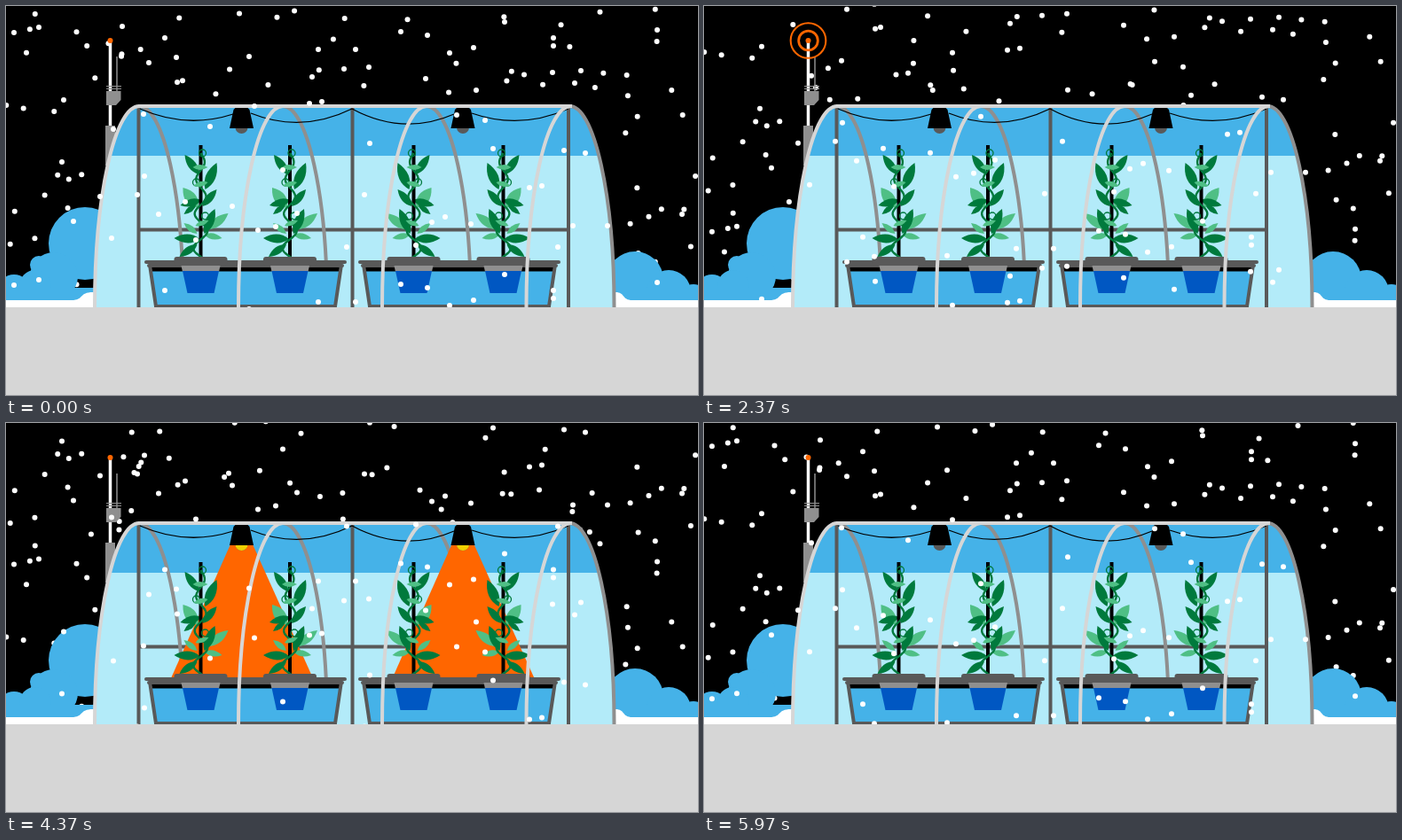
Write an HTML page with a canvas that moves like this. It is 780x439 px and loops after 6010 ms.

```html
<!DOCTYPE html>
<html lang="en">
<head>
<meta charset="utf-8">
<title>Greenhouse in the snow</title>
<style>
html, body { margin: 0; width: 100%; height: 100%; overflow: hidden; background: #000; }
canvas { display: block; }
</style>
</head>
<body>
<canvas id="stage" width="780" height="439"></canvas>
<script>
const c = document.getElementById('stage').getContext('2d');
const LOOP = 6010, FALL = LOOP / 2, TILE = 285;
const SKY = '#45b2e8', PALE = '#b3ebf9', LIGHT = '#d6d6d6', MID = '#8f8f8f', DARK = '#595959';
const ORANGE = '#ff6600', LEAF = '#007a3d', MINT = '#4fbf85', POT = '#0057c2';

// Flakes in front of the greenhouse, x and y at the start of the loop
const front = [
  155,122, 230,136, 156,192, 148,213, 172,235, 255,226, 284,253, 304,249, 328,234, 312,185,
  410,155, 404,213, 384,272, 508,123, 540,129, 549,161, 590,205, 604,203, 629,163, 653,166,
  639,248, 622,272, 678,248, 495,238, 480,244, 462,270, 524,246, 121,139, 106,215, 119,262,
  280,113, 342,110, 356,108, 345,80, 161,64, 193,86, 381,71, 409,69, 530,95, 616,75,
  641,87, 214,264, 352,49, 394,49, 274,57, 192,58, 562,18, 617,45, 617,36, 500,53,
  445,29, 179,36, 475,33, 473,82, 527,47, 648,73, 9,30, 37,24, 734,27, 202,221,
  63,176, 76,243, 65,106, 762,235
];

let seed = 41;
const random = () => (seed = (seed * 16807) % 2147483647) / 2147483647;
const back = Array.from({ length: 230 }, (_, i) => random() * (i % 2 ? TILE : 780));

const clamp = v => Math.max(0, Math.min(1, v));

function rect(color, x, y, w, h, r = 0) {
  c.fillStyle = color;
  c.beginPath();
  c.roundRect(x, y, w, h, r);
  c.fill();
}

function poly(color, ...p) {
  c.fillStyle = color;
  c.beginPath();
  for (let i = 0; i < p.length; i += 2) c.lineTo(p[i], p[i + 1]);
  c.fill();
}

function line(color, width, ...p) {
  c.strokeStyle = color;
  c.lineWidth = width;
  c.beginPath();
  for (let i = 0; i < p.length; i += 2) c.lineTo(p[i], p[i + 1]);
  c.stroke();
}

function disc(color, x, y, r) {
  c.fillStyle = color;
  c.beginPath();
  c.arc(x, y, r, 0, 7);
  c.fill();
}

// Quarter ellipse from the roof to the ground; side is -1 or 1
function arch(color, x, side, bottom = 340) {
  c.save();
  c.beginPath();
  c.rect(0, 0, 780, bottom);
  c.clip();
  c.strokeStyle = color;
  c.lineWidth = 4;
  c.beginPath();
  c.ellipse(x, 340, 50, 227, 0, side < 0 ? Math.PI : -Math.PI / 2, side < 0 ? 1.5 * Math.PI : 0);
  c.stroke();
  c.restore();
}

function snow(flakes, t) {
  const shift = t / FALL * TILE;
  for (let i = 0; i < flakes.length; i += 2) {
    const y = (flakes[i + 1] + shift) % TILE;
    for (const dy of [-TILE, 0, TILE]) {
      if (y + dy > -4 && y + dy < 345) disc('#fff', flakes[i], y + dy, 3);
    }
  }
}

function leaf(color, x, y, tx, ty, fat = 0.34) {
  const mx = x + (tx - x) * 0.45, my = y + (ty - y) * 0.45;
  const nx = (y - ty) * fat, ny = (tx - x) * fat;
  c.fillStyle = color;
  c.beginPath();
  c.moveTo(x, y);
  c.quadraticCurveTo(mx + nx, my + ny, tx, ty);
  c.quadraticCurveTo(mx - nx, my - ny, x, y);
  c.fill();
}

function plant(x, flip) {
  c.save();
  c.translate(x, 0);
  c.scale(flip, 1);
  leaf(LEAF, -2, 190, -18, 168);
  leaf(LEAF, 5, 207, 18, 177);
  leaf(MINT, -3, 228, -20, 205, 0.45);
  leaf(LEAF, 2, 226, 18, 207);
  leaf(LEAF, 1, 219, -23, 225);
  leaf(LEAF, -5, 224, -19, 235);
  leaf(MINT, 8, 252, 31, 234);
  leaf(LEAF, 4, 257, 16, 229);
  leaf(MINT, -4, 257, -19, 245);
  leaf(LEAF, -1, 263, -30, 262);
  leaf(MINT, 4, 258, 24, 262);
  leaf(LEAF, -4, 269, -24, 283);
  line('#000', 4, 0, 157, 0, 285);
  c.strokeStyle = LEAF;
  c.lineWidth = 2.4;
  c.beginPath();
  for (let y = 166; y <= 284; y++) {
    c.lineTo(Math.sin((y - 166) / 6.2) * (4 + (y - 166) / 24), y);
  }
  c.stroke();
  c.lineWidth = 1.3;
  for (const [cx, cy] of [[2, 166], [-5, 199], [5, 237]]) {
    c.beginPath();
    c.arc(cx, cy, 4, 0, 7);
    c.stroke();
  }
  leaf(MINT, -9, 182, 8, 182);
  leaf(MINT, 8, 199, -8, 203);
  leaf(MINT, -6, 248, 9, 242);
  c.restore();
}

function pot(x) {
  rect(DARK, x - 30, 283, 60, 11, 3);
  poly(MID, x - 22, 293, x + 22, 293, x + 20.5, 300, x - 20.5, 300);
  poly(POT, x - 20.5, 299, x + 20.5, 299, x + 15, 324, x - 15, 324);
}

function planter(x) {
  poly('#000', x + 6, 290, x + 222, 290, x + 221, 300, x + 7, 300);
  poly(SKY, x + 7, 299.5, x + 221, 299.5, x + 215, 339, x + 13, 339);
  line(DARK, 4, x + 6, 292, x + 13, 339, x + 215, 339, x + 222, 292);
  rect(DARK, x, 287, 228, 4, 2);
  rect(DARK, x + 3, 291, 222, 4, 2);
}

function clouds() {
  for (const [x, y, r] of [[89, 268, 41], [37, 292, 10], [54, 305, 27], [9, 321, 18],
    [33, 316, 18], [709, 309, 32], [747, 323, 25], [775, 331, 17]]) disc(SKY, x, y, r);
  rect(SKY, 0, 318, 105, 16);
  rect(SKY, 680, 318, 95, 16);
  rect('#fff', 0, 332, 780, 9);
  c.fillStyle = '#fff';
  c.beginPath();
  c.moveTo(74, 332);
  c.bezierCurveTo(88, 332, 82, 323, 98, 323);
  c.lineTo(687, 323);
  c.bezierCurveTo(698, 323, 694, 332, 706, 332);
  c.fill();
}

function antenna(t) {
  line(MID, 1.5, 125, 57, 125, 97);
  line('#fff', 3.5, 117.5, 40, 117.5, 136);
  rect(MID, 112, 135, 11, 45);
  poly(MID, 113, 96, 129.5, 96, 129.5, 106, 124, 112, 113, 112);
  line(MID, 1, 113, 90.5, 130, 90.5);
  line(MID, 1, 113, 93.5, 130, 93.5);
  disc(ORANGE, 117.5, 39, 3);
  for (const start of [920, 1145, 1875, 2100]) {
    const p = (t - start) / 900;
    if (p <= 0 || p >= 1) continue;
    c.strokeStyle = ORANGE;
    c.lineWidth = 0.7 + 3 * (1 - p);
    c.beginPath();
    c.arc(117.5, 39, 36 * p, 0, 7);
    c.stroke();
  }
}

function wires() {
  c.strokeStyle = '#000';
  c.lineWidth = 1.3;
  c.beginPath();
  for (const [x1, y1, x2, y2, sag] of [[151, 116, 256, 122, 139], [276, 121, 390, 116, 144],
    [390, 116, 505, 122, 147], [525, 121, 634, 116, 140]]) {
    c.moveTo(x1, y1);
    c.quadraticCurveTo((x1 + x2) / 2, sag, x2, y2);
  }
  c.stroke();
}

function lamp(x, glow) {
  disc(DARK, x, 137, 7);
  c.globalAlpha = glow;
  disc('#f0d000', x, 137, 7);
  c.globalAlpha = 1;
  poly('#000', x - 9, 117, x - 7, 115, x + 7, 115, x + 9, 117, x + 13.5, 138, x - 13.5, 138);
}

function house(t) {
  const glow = clamp((t - 2550) / 450) * clamp((5700 - t) / 450);
  c.save();
  c.beginPath();
  c.ellipse(150, 340, 50, 227, 0, Math.PI, 1.5 * Math.PI);
  c.ellipse(635, 340, 50, 227, 0, -Math.PI / 2, 0);
  c.clip();
  rect(SKY, 98, 110, 590, 60);
  rect(PALE, 98, 169, 590, 172);
  c.restore();

  line(DARK, 4, 149, 252.5, 634, 252.5);
  for (const x of [150, 312, 474]) arch(MID, x, 1, 290);
  for (const x of [149.5, 390.5, 634]) line(DARK, 4, x, 115, x, 340);
  wires();
  c.globalAlpha = glow;
  for (const x of [265.5, 515]) poly(ORANGE, x - 13, 138, x + 13, 138, x + 80.5, 288, x - 79.5, 288);
  c.globalAlpha = 1;
  lamp(265.5, glow);
  lamp(515, glow);

  planter(156);
  planter(397);
  [219.5, 320, 459.5, 560.5].forEach((x, i) => {
    plant(x, i < 2 ? 1 : -1);
    pot(x);
  });

  arch(MID, 635.5, 1);
  for (const x of [150, 312, 474, 636.5]) arch(LIGHT, x, -1);
  line(LIGHT, 4, 149, 113, 638, 113);
}

function draw(t) {
  rect('#000', 0, 0, 780, 439);
  snow(back, t);
  clouds();
  antenna(t);
  house(t);
  snow(front, t);
  rect(LIGHT, 0, 340, 780, 99);
}

const begin = performance.now();
function tick() {
  draw((performance.now() - begin) % LOOP);
  requestAnimationFrame(tick);
}
tick();
</script>
</body>
</html>
```
